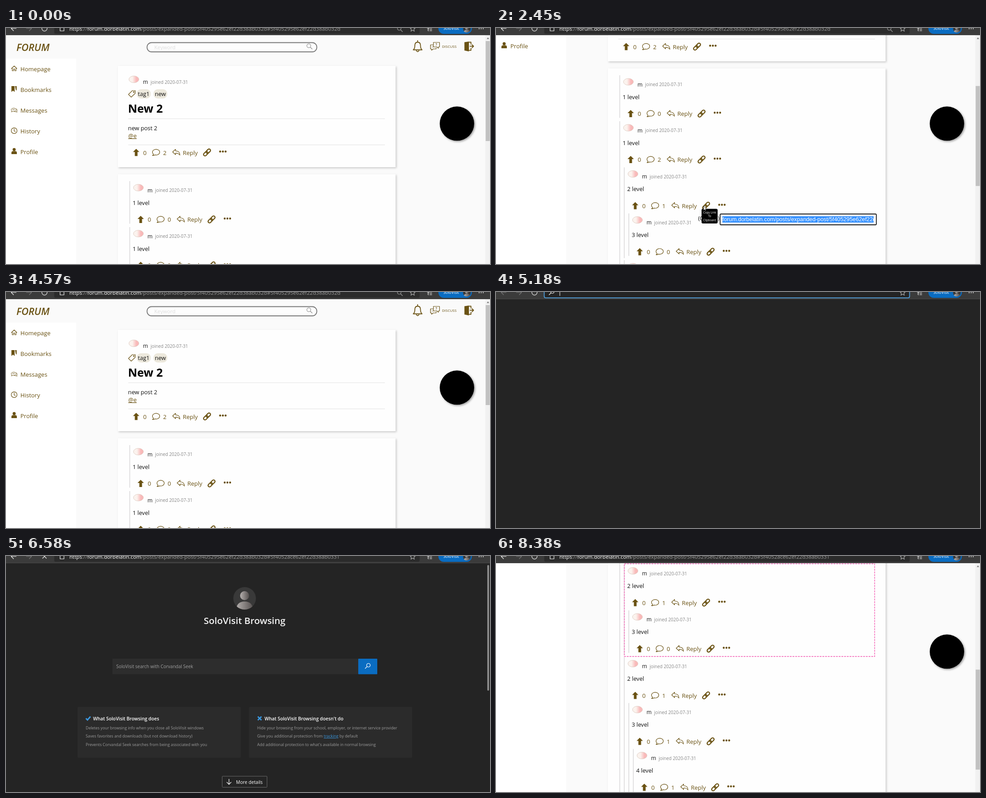
Animation, 1069 px wide and 524 px high, one loop 8.78 s. Source, as an HTML page:

```html
<!DOCTYPE html>
<html lang="en">
<head>
<meta charset="utf-8">
<title>Forum link demo</title>
<style>
html, body { margin: 0; width: 100%; height: 100%; overflow: hidden; background: #fafafa; }
svg { display: block; width: 1069px; height: 524px; }
text { font-family: "Open Sans", "Noto Sans", sans-serif; white-space: pre; }
.line { fill: none; stroke: #6a5213; stroke-width: 1.2; stroke-linejoin: round; stroke-linecap: round; }
.solid { fill: #6a5213; }
.pale { fill: none; stroke: #ddd; stroke-width: 1.3; }
.card { fill: #fefefe; filter: drop-shadow(2px 2px 2px #0003); }
</style>
</head>
<body>
<svg id="stage" viewBox="0 0 1069 524"></svg>
<script>
const LOOP = 8780;
const BROWN = '#6a5213', INK = '#111', GRAY = '#878787';
const HOST = 'forum.dorbelatin.com';
const PATH = '/posts/expanded-post/5f405295e62ef22d38ab032d';
const MODE = 'SoloVisit', SEARCH = 'Corvandal Seek';

const txt = (x, y, size, s, fill = INK, more = '') =>
  `<text x="${x}" y="${y}" font-size="${size}" fill="${fill}" ${more}>${s}</text>`;
const box = (x, y, w, h, fill, more = '') =>
  `<rect x="${x}" y="${y}" width="${w}" height="${h}" fill="${fill}" ${more}/>`;
const use = (id, x, y) => `<use href="#${id}" x="${x}" y="${y}"/>`;
const group = (id, body) => `<g id="${id}">${body}</g>`;

const defs = `<defs>
<linearGradient id="fur"><stop offset=".35" stop-color="#fbf3ee"/><stop offset=".75" stop-color="#f9b9b9"/></linearGradient>
<linearGradient id="face"><stop offset="0" stop-color="#b5b0ae"/><stop offset="1" stop-color="#55504f"/></linearGradient>
<clipPath id="disc"><circle cx="527" cy="94" r="25"/></clipPath>
<clipPath id="field"><rect x="500" y="650" width="334" height="20"/></clipPath>
<ellipse id="pet" rx="11" ry="7.5" fill="url(#fur)" stroke="#d9c3b8" stroke-width=".8"/>
<path id="up" class="solid" d="M0-8 7-1H3V8H-3V-1H-7Z"/>
<path id="bubble" class="line" d="M-8 6.8Q-6 5.6-5.5 4A8 6.3 0 1 1-2.5 5.4Q-5 7.2-8 6.8Z"/>
<path id="reply" class="line" d="M-8-1-1.5-7V-3.5C4-3.5 8-1 8 6 6 2.5 3 1.5-1.5 1.5V5Z"/>
<g id="link" transform="rotate(-45)" class="line" style="stroke-width:2.3">
<rect x="-9.5" y="-3.2" width="11" height="6.4" rx="3.2"/><rect x="-1.5" y="-3.2" width="11" height="6.4" rx="3.2"/></g>
<g id="dots" class="solid"><circle cx="-6" r="2.2"/><circle r="2.2"/><circle cx="6" r="2.2"/></g>
<g id="lens"><circle cx="1.5" cy="-1.5" r="4"/><path d="M-1.5 1.5-6 6"/></g>
</defs>`;

// Vote, comment count, reply, link and menu
const actions = (x, y, count) =>
  use('up', x + 17.5, y) + txt(x + 33, y + 5.2, 13, 0, BROWN) +
  use('bubble', x + 61.5, y) + txt(x + 77, y + 5.2, 13, count, BROWN) +
  use('reply', x + 106, y) + txt(x + 120.5, y + 5.2, 13, 'Reply', BROWN) +
  `<g transform="translate(${x + 174} ${y})">${use('link', 0, 0)}</g>` +
  use('dots', x + 209, y - 2);

const author = (x, y) =>
  use('pet', x + 12.5, y - 6) + txt(x + 32.5, y + 4, 12, 'm') +
  txt(x + 49.3, y + 3.6, 9.9, 'joined 2020-07-31', GRAY);

const comment = ([level, y, count, end]) => {
  const x = 270 + level * 10;
  return box(x - 7.5, y - 20.5, 1.7, end - y + 20.5, '#dcdadb') + author(x, y) +
    txt(x - .3, y + 32, 12.7, level + ' level') + actions(x, y + 64.5, count);
};
const comments = [
  [1, 360.5, 0, 434.5], [1, 462.5, 2, 1130], [2, 565, 1, 746], [3, 667.2, 0, 741],
  [2, 771, 1, 1130], [3, 873, 1, 1130], [4, 975, 1, 1130]
];

const sidebar = box(0, 68, 155, 1100, '#fff') +
  `<path class="line" d="M12 90 18 84.3 24 90M13.8 88.5V95H16.6V91H19.4V95H22.2V88.5"/>
  <path class="solid" d="M12 129H19V142L15.5 139 12 142ZM20 129H23.5V139L21.5 137Z"/>
  <path class="line" style="stroke-width:.9" d="M12 186Q13.2 185 13 184A5.5 3.6 0 1 1 15.5 185Q14 186.3 12 186ZM18 185.2Q20 186.6 22 185.8L24.5 187 23.8 184.8Q26 181 22.5 179.3M14.5 181.2h4.5"/>
  <circle class="line" cx="18" cy="228" r="6.4"/><path class="line" d="M18 223.8V228.4L20.5 230"/>
  <circle class="solid" cx="18" cy="270" r="3.4"/><path class="solid" d="M12 280V277Q12 273.5 15 273.5H21Q24 273.5 24 277V280Z"/>` +
  ['Homepage', 'Bookmarks', 'Messages', 'History', 'Profile']
    .map((s, i) => txt(31.8, 95.6 + i * 46, 13, s, BROWN)).join('');

const header = txt(23, 50.5, 21.8, 'FORUM', BROWN, 'font-style="italic" font-weight="600"') +
  box(311.5, 32.5, 375, 20.5, '#fdfdfd', 'rx="10" stroke="#777" stroke-width="1.8"') +
  txt(327.5, 47, 11.6, 'Keyword', '#ddd') +
  `<g fill="none" stroke="#888" stroke-width="1.1"><circle cx="668.8" cy="39.5" r="4.3"/><path d="M672 42.5 676.5 47"/></g>
  <path class="line" style="stroke-width:1.8" d="M899.5 48.5Q903 46 903 39 903 31.5 909.2 31.5 915.5 31.5 915.5 39 915.5 46 919 48.5ZM909.2 31V27.8M906.5 50.5Q909.2 54.5 912 50.5"/>
  <path class="line" d="M944 37.5H937.5V46.5H940V49.5L943.5 46.5H950V44M944 32H957.5V42H955V45L951.5 42H944ZM940.5 42.2h.3m2.2 0h.3m2.2 0h.3"/>` +
  txt(948.5, 40, 8, '?', BROWN, 'font-weight="600"') +
  txt(963, 43.8, 8, 'DISCUSS', BROWN) +
  `<path class="solid" d="M1012.5 31.5 1022.5 30V52L1012.5 50Z"/>
  <path class="line" style="stroke-width:1.8" d="M1023 31.5H1027V36M1027 45V49.5H1023M1025 40.5H1032.5M1029.5 37.2 1032.7 40.5 1029.5 43.8"/>`;

const post = `<rect class="card" x="247" y="84" width="613.5" height="225"/>` + author(270, 120) +
  `<path class="line" d="M270.5 147.5 279 139H285.5V145L276.5 153.5Z"/><circle class="line" cx="282.3" cy="142.2" r="1"/>` +
  box(289, 136, 30.5, 20.5, '#ece8dc', 'rx="9"') + txt(291.3, 150.5, 12.6, 'tag1') +
  box(326, 136, 30, 20.5, '#ece8dc', 'rx="9"') + txt(328.7, 150.5, 12.6, 'new') +
  txt(269.5, 188, 25, 'New 2', '#000', 'font-weight="700"') +
  box(270, 201, 567, 1, '#e2e2e2') + txt(269.6, 227, 12.7, 'new post 2') +
  txt(270, 244, 12.7, '@e', BROWN, 'text-decoration="underline"') +
  box(270, 259, 567, 1, '#e2e2e2') + actions(270, 276.3, 2);

const popup = group('copied', txt(446.5, 661.5, 12.2, '(Copied)') +
  box(495, 648, 345, 24, '#fff', 'rx="2" stroke="#1a1a1a" stroke-width="1.8"') +
  box(500, 653, 334, 14, '#3390ff') +
  txt(500, 664, 12.3, HOST + PATH, '#fff', 'clip-path="url(#field)" style="font-family:\'Liberation Sans\',Arial,sans-serif"'));
const tip = group('tip', box(454, 636.5, 35.5, 32.5, '#000', 'rx="3"') +
  ['Copy Link', 'To', 'Clipboard'].map((s, i) =>
    txt(471.8, 646.7 + i * 8.6, 6.2, s, '#fff', 'text-anchor="middle"')).join(''));
const mark = group('mark', box(283.5, 543.3, 552.8, 205.8, 'none', 'stroke="#f472bd" stroke-width="1.7" stroke-dasharray="4 2"'));

const forum = group('forum', box(0, 0, 1069, 524, '#fafafa') +
  group('page', header + sidebar + post +
    `<rect class="card" x="247" y="324.5" width="613.5" height="820"/>` +
    comments.map(comment).join('') + mark + popup + tip) +
  `<circle cx="996" cy="212.3" r="38" fill="#000" style="filter:drop-shadow(2px 2px 2px #0006)"/>` +
  box(1058.5, 16, 10.5, 508, '#f1f1f1') + `<path d="M1061.8 24.5 1064.5 21 1067.2 24.5Z" fill="#777"/>` +
  box(1059.5, 29, 9, 222, '#c1c1c1', 'id="thumb"'));

const panel = (x, icon, head, lines) => box(x, 335, 360.5, 113, '#2b2b2b', 'rx="2"') +
  `<path d="${icon}" transform="translate(${x + 23.5} 360.5)" fill="none" stroke="#3a96dd" stroke-width="3"/>` +
  txt(x + 34.3, 365, 10.3, head, '#fff', 'font-weight="600"') +
  lines.map((s, i) => txt(x + 18, 384.5 + i * 18.6, 8.75, s, '#9b9b9b')).join('');

const start = group('start', `<circle cx="527" cy="94" r="25" fill="#393939"/>
  <g clip-path="url(#disc)" fill="url(#face)"><circle cx="527" cy="88" r="10"/><path d="M508 121Q509 101 527 101 545 101 546 121Z"/></g>` +
  txt(527, 150.5, 20.5, MODE + ' Browsing', '#f2f2f2', 'font-weight="600" text-anchor="middle"') +
  box(235, 228, 543, 34.5, '#2d2d2d') + box(778, 228, 42, 34.5, '#0a6cc1', 'rx="1"') +
  `<g stroke="#fff" fill="none" stroke-width="1.2">${use('lens', 799, 244)}</g>` +
  txt(243.5, 249.3, 10, `${MODE} search with ${SEARCH}`, '#a0a0a0') +
  panel(158, 'M-5 0-1.5 3.5 5-4', `What ${MODE} Browsing does`, [
    `Deletes your browsing info when you close all ${MODE} windows`,
    'Saves favorites and downloads (but not download history)',
    `Prevents ${SEARCH} searches from being associated with you`]) +
  panel(536.7, 'M-4-4 4 4M4-4-4 4', `What ${MODE} Browsing doesn't do`, [
    'Hide your browsing from your school, employer, or internet service provider',
    'Give you additional protection from <tspan fill="#3a96dd" text-decoration="underline">tracking</tspan> by default',
    "Add additional protection to what's available in normal browsing"]) +
  box(477.5, 489, 99, 24.5, 'none', 'stroke="#6b6b6b" rx="1"') +
  '<path d="M492.5 495V507M487.5 502 492.5 507.2 497.5 502" fill="none" stroke="#fff" stroke-width="1.2"/>' +
  txt(508, 505.6, 10.2, 'More details', '#fff') + box(1063, 20, 4, 279, '#8a8a8a', 'rx="2"'));

const typed = HOST + PATH + '#5f4052ace62ef22d38ab0331';
const list = group('list', box(106, 13, 808.5, 81, '#2b2b2b', 'rx="2"') + box(106, 15, 808.5, 39, '#404040') +
  txt(140, 38, 11.6, typed, '#fff') + txt(140, 78, 11.6, typed, '#ccc') +
  `<circle cx="123" cy="34" r="5" fill="none" stroke="#ddd"/><g stroke="#ddd" fill="none">${use('lens', 123, 74)}</g>`);

const address = (id, hash) => txt(140, 5.8, 11.6,
  `https<tspan fill="#9a9a9a">://</tspan>${HOST}<tspan fill="#9a9a9a">${PATH}#${hash}</tspan>`, '#fff', `id="${id}"`);

const bar = box(0, 0, 1069, 16, '#3b3b3b') + box(0, 15, 1069, 1, '#4a4a4a') +
  box(106.5, -12, 807, 24.8, '#2b2b2b', 'rx="3" id="omni"') +
  `<g fill="none" stroke="#f2f2f2" stroke-width="1.2">
  <path id="back" d="M23 1H11.5M17-5 11.5 1 17 6.5"/><path stroke="#777" d="M44.5 1H56.5M51-5 56.5 1 51 6.5"/>
  <circle id="reload" cx="85" cy="1" r="5.8"/><path id="stop" d="M80.5-4 89.5 5.5M89.5-4 80.5 5.5"/>
  <path id="lock" d="M119.5-1.5H128V6.5H119.5Z"/><g id="find">${use('lens', 123, .5)}</g>
  <g id="zoom" stroke="#999" transform="translate(870 2.5) scale(-1 1)">${use('lens', 0, 0)}</g>
  <path stroke="#aaa" d="M892.5 0H896L898 -4 900 0H903.8L901 3 901.8 7 898 4.8 894.5 7 895.2 3Z"/>
  <path d="M930 1H934L932 4 933 7M936 0H941M935.5 3H941M935.5 6H941"/></g>` +
  box(955, -12, 74, 25, '#0a6cc1', 'rx="12"') + txt(966, 4.3, 8.8, MODE, '#fff') +
  `<circle cx="1018" cy="1.5" r="8.5" fill="#393939"/><circle cx="1018" cy="0" r="3.5" fill="url(#face)"/><path d="M1011.5 8Q1012 4 1018 4 1024 4 1024.5 7 1021 10 1018 10 1014 10 1011.5 8Z" fill="url(#face)"/>
  <g fill="#f2f2f2"><circle cx="1045" cy="1.5" r="1.1"/><circle cx="1049.5" cy="1.5" r="1.1"/><circle cx="1054" cy="1.5" r="1.1"/></g>` +
  address('first', '5f405295e62ef22d38ab032d') + address('second', '5f4052ace62ef22d38ab0331') +
  txt(140, 5.8, 11.6, typed, '#fff', 'id="typed"') + box(140.5, 0, 1, 8.5, '#fff', 'id="caret"');

const pointers = `<path id="arrow" d="M0 0V10L2.4 7.9 4 11 5.3 10.4 3.8 7.4H6.8Z" fill="#fff" stroke="#222" stroke-width=".9"/>
  <path id="beam" d="M293 7.5H294.6L295.3 8.2 296 7.5H297.6M295.3 8V15M293 15.5H294.6L295.3 14.8 296 15.5H297.6" fill="none" stroke="#ddd" stroke-width=".9"/>`;

document.getElementById('stage').innerHTML = defs + box(0, 0, 1069, 524, '#fafafa') + forum +
  group('dark', box(0, 0, 1069, 524, '#242424') + start) + bar + list + pointers;

const el = id => document.getElementById(id);
// When each part is on screen, in ms
const shown = {
  forum: [[0, 5180], [6820, LOOP]], dark: [[5180, 6680]], start: [[5420, 6680]],
  tip: [[2360, 2840]], copied: [[2450, 5180]], mark: [[6820, LOOP]],
  first: [[0, 5180]], second: [[6580, LOOP]], typed: [[5720, 6580]], caret: [[5180, 6270]],
  list: [[5810, 6580]], lock: [[0, 5180], [6580, LOOP]], find: [[5180, 6580]], zoom: [[0, 5180]],
  reload: [[0, 6580], [7060, LOOP]], stop: [[6580, 7060]],
  arrow: [[270, 4560], [6680, 8380]], beam: [[5420, 5720]]
};
const scroll = [[820, 0], [960, 78], [980, 81], [1050, 81], [1210, 157], [1290, 157], [1480, 235],
  [3550, 235], [3740, 157], [3920, 78], [4120, 0], [6900, 0], [7060, 526]];
const mouse = [[270, 1010, 526], [860, 479, 273.5], [1500, 479, 273.5], [2080, 458.5, 395], [2760, 458.5, 395],
  [3380, 442, 362], [3950, 442, 362], [4410, 300, 25], [4560, 296, -16], [6680, 324, 29],
  [7220, 324, 29], [8080, 979, 484], [8380, 1014, 526]];

function at(steps, t) {
  const i = steps.findIndex(s => s[0] > t);
  if (i < 0) return steps[steps.length - 1].slice(1);
  if (i === 0) return steps[0].slice(1);
  const a = steps[i - 1], b = steps[i];
  const p = (t - a[0]) / (b[0] - a[0]), e = p * p * (3 - 2 * p);
  return a.slice(1).map((v, k) => v + (b[k + 1] - v) * e);
}

function draw() {
  const t = performance.now() % LOOP;
  for (const id in shown)
    el(id).style.display = shown[id].some(([a, b]) => t >= a && t < b) ? '' : 'none';
  const [y] = at(scroll, t);
  el('page').setAttribute('transform', `translate(0 ${-y})`);
  el('thumb').setAttribute('y', 29 + y * .4245);
  el('arrow').setAttribute('transform', `translate(${at(mouse, t)})`);
  const focus = t >= 5180 && t < 6580;
  el('omni').setAttribute('stroke', focus ? '#4f9fdc' : 'none');
  el('omni').setAttribute('stroke-width', 1.8);
  el('omni').setAttribute('fill', focus ? '#242424' : '#2b2b2b');
  el('back').setAttribute('stroke', focus ? '#777' : '#f2f2f2');
  el('caret').setAttribute('x', t < 5720 ? 140.5 : 698);
  requestAnimationFrame(draw);
}
draw();
</script>
</body>
</html>
```
